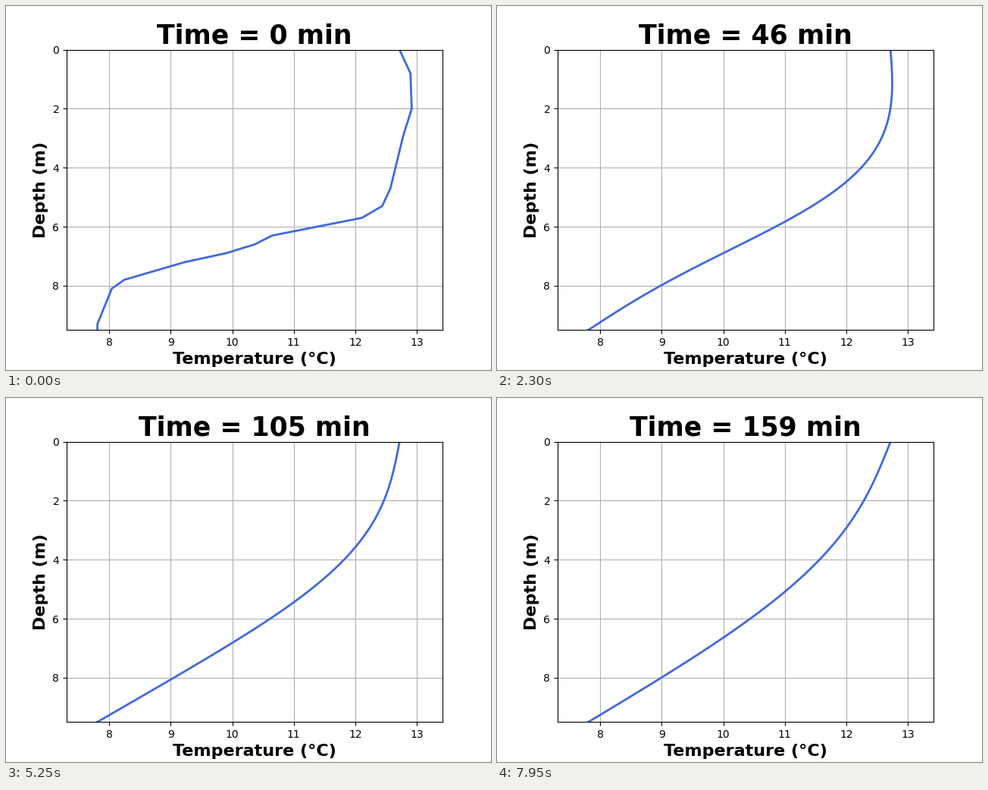
A matplotlib script for the animation above (8 s loop, 640 by 480 pixels).

```python
import numpy as np
import matplotlib.pyplot as plt
from matplotlib.animation import FuncAnimation

DEPTH = 9.5           # m
DIFFUSIVITY = 0.0376  # m^2 per minute
MINUTES = 160

# Key points of the starting profile; constant below the last one
knots = [0, 0.8, 2, 2.9, 4.7, 5.3, 5.7, 6.3, 6.6, 6.9, 7.2, 7.8, 8.1, 9.3]
temps = [12.718, 12.895, 12.916, 12.78, 12.57, 12.436, 12.107,
         10.648, 10.365, 9.897, 9.23, 8.246, 8.043, 7.81]

z = np.linspace(0, DEPTH, 96)
start = np.interp(z, knots, temps)
steady = np.linspace(start[0], start[-1], z.size)

# Sine modes that vanish at both ends
waves = np.arange(1, z.size - 1) * np.pi / DEPTH
modes = np.sin(np.outer(z, waves))
weights = modes.T @ (start - steady) * 2 / (z.size - 1)


def temperature(minute):
    """Heat diffusion with both end temperatures held fixed."""
    decay = np.exp(-DIFFUSIVITY * waves**2 * minute)
    return steady + modes @ (weights * decay)


fig, ax = plt.subplots(figsize=(6.4, 4.8), dpi=100)
line, = ax.plot(start, z, color="royalblue", linewidth=2)
title = ax.set_title("Time = 0 min", fontsize=25, fontweight="bold")
ax.set_xlabel("Temperature (°C)", fontsize=16, fontweight="bold")
ax.set_ylabel("Depth (m)", fontsize=16, fontweight="bold")
ax.set_xlim(start.min() - 0.5, start.max() + 0.5)
ax.set_ylim(DEPTH, 0)
ax.grid(True)


def update(minute):
    line.set_xdata(temperature(minute))
    title.set_text(f"Time = {minute} min")
    return line, title


anim = FuncAnimation(fig, update, frames=MINUTES, interval=50, repeat=True)
plt.show()
```
